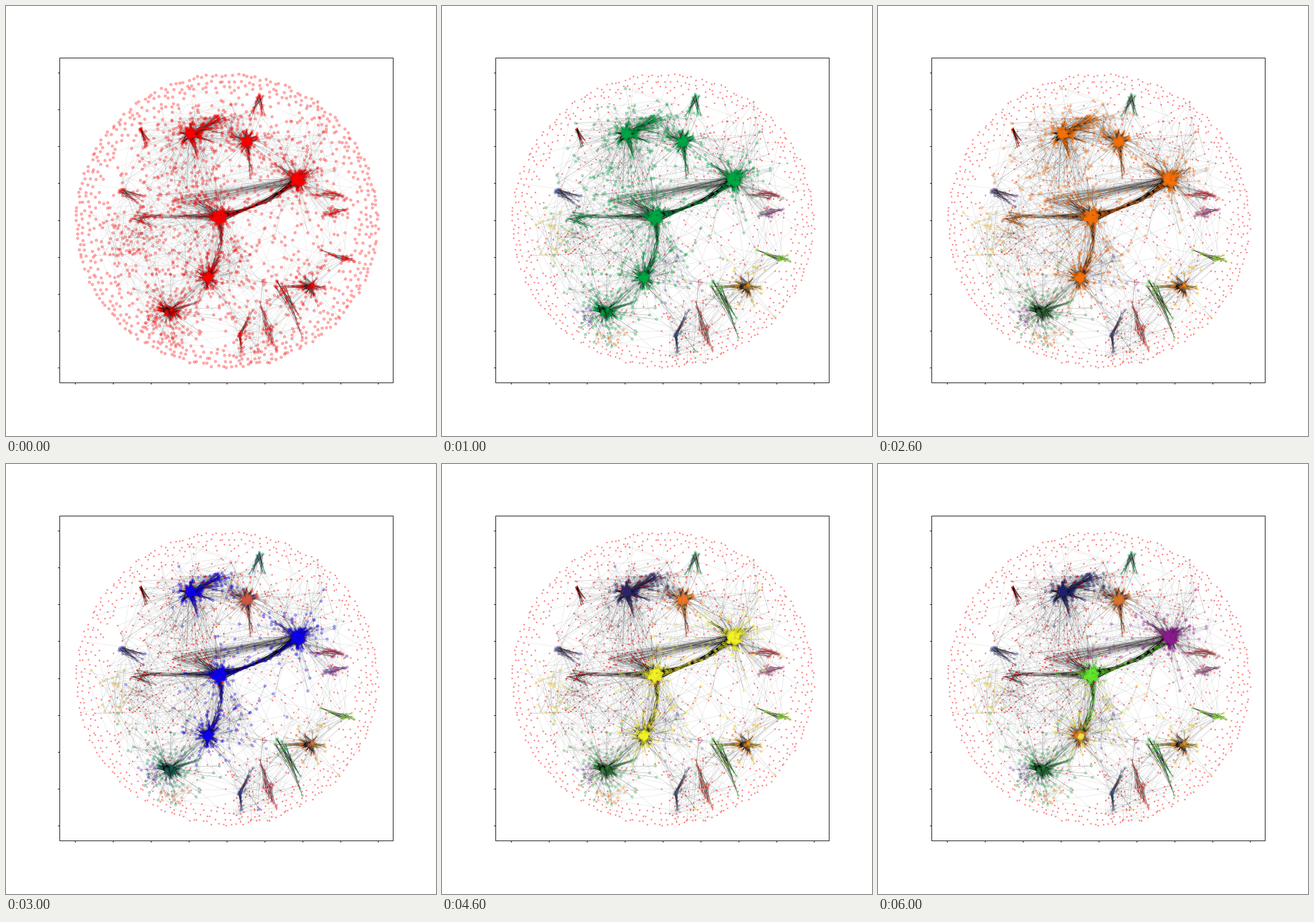
Animation of 748 by 748 pixels, one loop 7000 ms. Source, as a matplotlib script:

```python
import numpy as np
import matplotlib.pyplot as plt
from matplotlib.animation import FuncAnimation
from matplotlib.collections import LineCollection
from matplotlib.colors import to_rgb

STAGE, DPI = 748, 100
CENTRE, RADII = np.array([385, 373.5]), np.array([261, 253])
RED = "#ff0000"

# Colour of the largest community at each split, and how much it tints the rest
MAIN = ["#00aa46", "#fa730a", "#0f00f0", "#f5f528", "#aa00b4", "#64eb32"]
TINT = 0.12

# Step at which a group leaves the largest community, and its own colour;
# None marks loose nodes, which are drawn as small red dots.
SPLIT = {
    "dot": (1, None), "wide": (3, None), "bridge": (7, RED),
    "A": (4, "#140a78"), "B": (3, "#f0692d"), "C": (6, "#9600a0"),
    "D": (7, RED), "E": (5, "#f5e11e"), "E core": (5, "#f07328"),
    "E middle": (5, "#faeb50"), "F": (2, "#1e7846"), "F far": (2, "#1ea04b"),
    "G": (1, "#f5b91e"), "G core": (1, "#eb7828"), "H": (1, "#323c87"),
    "I": (1, "#eb2828"), "J": (1, "#e12846"), "K": (1, "#b4469b"),
    "L": (1, "#82e61e"), "M": (1, "#413ca5"), "Q": (2, "#1e9169"),
    "R": (1, "#f5c31e"), "S": (1, "#32c346"), "T": (1, "#f0821e"),
    "U": (1, "#7832b4"), "V": (1, "#6446c3"),
}

# Small communities: x, y, spread, then angle and length of two arms
MINOR = {
    "H": (407, 569, 6, -64, 45, 88, 32), "I": (455, 562, 6, 254, 49, 73, 37),
    "J": (566, 327, 8, 176, 32, 5, 20), "K": (570, 359, 7, -14, 25, 170, 18),
    "L": (587, 440, 5, 196, 42, 14, 16), "M": (200, 322, 5, 14, 43, 32, 46),
    "Q": (441, 160, 4, 118, 36, 80, 36), "S": (478, 495, 14, 55, 60, 66, 90),
    "wide": (230, 369, 8, -8, 40, 30, 30), "dot": (235, 213, 2, 72, 33, 60, 28),
}

rng = np.random.default_rng(11)
pos, group, links, weight = [], [], [], []


def add(p, name):
    """Place a node, pulling strays back inside the circle."""
    offset = (np.asarray(p) - CENTRE) / RADII
    dist = np.hypot(*offset)
    if dist > 1.02:
        offset *= rng.uniform(0.75, 0.9) / dist
    pos.append(CENTRE + offset * RADII)
    group.append(name)
    return len(pos) - 1


def polar(r, angle):
    return np.array([r * np.cos(angle), r * np.sin(angle)])


def attach(node, targets, k, w):
    for other in rng.choice(targets, k):
        links.append((node, other))
        weight.append(w)


def ring(r, n):
    for i in range(n):
        angle = (i + rng.uniform(-0.4, 0.4)) * 2 * np.pi / n
        add(CENTRE + RADII * polar(r + rng.uniform(-0.012, 0.012), angle), "dot")


def loose(n, gap):
    """Single nodes over the disc that keep a distance from each other."""
    while n:
        r = 0.9 * np.sqrt(rng.random())
        p = CENTRE + RADII * polar(r, rng.uniform(0, 2 * np.pi))
        if np.min(np.hypot(*(np.array(pos) - p).T)) > gap:
            add(p, "dot")
            n -= 1


def cloud(name, n, centre, spread, targets=None, share=0.3):
    nodes = [add(rng.normal(centre, spread), name) for _ in range(n)]
    for node in nodes:
        attach(node, nodes, 1, 0.16)
        if targets and rng.random() < share:
            attach(node, targets, 1, 0.18)
    return nodes


def hub(centre, name, far_name, core, radius, spikes, far, reach):
    phase = rng.uniform(0, 6)
    inner = []
    for angle in rng.uniform(0, 2 * np.pi, core):
        r = radius * np.sqrt(rng.random()) * (1 + 0.2 * np.sin(6 * angle + phase))
        inner.append(add(centre + polar(r, angle), name))
    rays = rng.uniform(0, 2 * np.pi, 18)
    for _ in range(spikes):
        angle = rng.choice(rays) + rng.normal(0, 0.06)
        p = centre + polar(rng.uniform(9, 22), angle)
        attach(add(p, name), inner, 7, 0.38)
    for angle in rng.uniform(0, 2 * np.pi, far):
        p = centre + polar(15 + rng.exponential(reach), angle)
        attach(add(p, far_name), inner, 2, 0.2)
    return inner


def arm(name, root, angle, length, n=8, k=4, w=0.3):
    """Bundle of nodes running away from a root cluster."""
    start = np.mean([pos[i] for i in root], axis=0)
    for t in np.linspace(0.25, 1, n):
        p = start + polar(length * t, np.radians(angle))
        attach(add(p + rng.normal(0, 1.8, 2), name), root, k, w)


def bridge(name, a, b, bulge, n, spread, k, w):
    """Chain of nodes on a bent path between two hubs."""
    p0, p1 = (np.mean([pos[i] for i in hub_], axis=0) for hub_ in (a, b))
    normal = np.array([p0[1] - p1[1], p1[0] - p0[0]])
    chain = []
    for t in np.linspace(0.08, 0.92, n):
        p = p0 + (p1 - p0) * t + normal * bulge * 4 * t * (1 - t)
        chain.append(add(p + rng.normal(0, spread, 2), name))
    for i, node in enumerate(chain):
        attach(node, chain[i:i + n // 3 + 1], k, w)
        if i < n * 0.4:
            attach(node, a, k, w)
        elif i > n * 0.6:
            attach(node, b, k, w)


def web(count, limit, first, w):
    """Faint links between nodes within a given distance."""
    for _ in range(count):
        a = rng.integers(first, len(pos))
        gaps = np.hypot(*(np.array(pos[first:]) - pos[a]).T)
        attach(a, first + np.flatnonzero(gaps < limit), 1, w)


for i, count in enumerate((192, 146, 118, 76)):
    ring(1 - 0.038 * i, count)
ring_count = len(pos)
loose(430, 6.5)
for centre in ((225, 415), (500, 250), (440, 575)):
    cloud("dot", 45, centre, 38)

A = hub((321, 222), "A", "A", 90, 8, 42, 26, 10)
B = hub((419, 236), "B", "B", 90, 9, 26, 36, 20)
C = hub((508, 303), "C", "C", 150, 11, 46, 48, 25)
D = hub((372, 367), "D", "D", 150, 11, 30, 24, 14)
E = hub((352, 472), "E core", "E", 90, 8, 40, 44, 22)
F = hub((284, 530), "F", "F far", 28, 8, 44, 60, 25)
G = hub((530, 487), "G core", "G", 18, 6, 20, 16, 14)
cloud("E middle", 34, (353, 473), 2)

bridge("bridge", D, C, 0.06, 42, 1.8, 7, 0.34)
bridge("bridge", D, E, -0.1, 32, 2.6, 4, 0.3)
bridge("A", A, B, -0.27, 26, 8, 2, 0.22)
bridge("C", B, C, 0.03, 10, 8, 1, 0.2)
arm("A", cloud("A", 34, (366, 202), 9, A, 1), 155, 46, 14)
arm("F far", F, -18, 60, 9, 3)
for name, root, arms in (
        ("A", A, ((75, 45), (23, 40), (-14, 38))), ("B", B, ((83, 62), (200, 30))),
        ("C", C, ((214, 52), (-30, 40))), ("D", D, ((181, 62),)),
        ("wide", D, ((220, 56), (181, 145))), ("G", G, ((178, 58), (10, 26)))):
    for angle, length in arms:
        arm(name, root, angle, length)

# Straight fan of long links into the right-hand hub
for node in cloud("wide", 28, (322, 338), (17, 7)):
    attach(node, C, 2, 0.18)
    attach(node, D, 2, 0.18)
for x in rng.uniform(360, 480, 14):
    node = add((x, 400 - 0.19 * x + rng.normal(0, 5)), "C")
    attach(node, C, 2, 0.2)

for name, (x, y, spread, *arms) in MINOR.items():
    root = cloud(name, 4 + spread, (x, y), spread * 0.7)
    for angle, length in zip(arms[::2], arms[1::2]):
        arm(name, root, angle, length, 7)

for name, n, centre, spread, near in (
        ("wide", 110, (320, 285), (48, 55), A), ("wide", 50, (305, 390), (50, 45), D),
        ("wide", 30, (345, 190), (50, 18), A), ("E", 40, (375, 425), (45, 35), E),
        ("C", 22, (470, 300), (45, 38), C), ("F far", 30, (285, 505), (45, 38), F),
        ("G", 14, (535, 455), (32, 24), G), ("R", 28, (190, 398), 24, None),
        ("T", 15, (300, 576), (18, 9), None), ("U", 15, (256, 538), 9, F),
        ("V", 12, (402, 480), (28, 24), None)):
    cloud(name, n, centre, spread, near)

web(1150, 95, ring_count, 0.15)
web(220, 170, 0, 0.13)

pos, weight = np.array(pos), np.array(weight)
order = {name: i for i, name in enumerate(SPLIT)}
kind = np.array([order[name] for name in group])

fig = plt.figure(figsize=(STAGE / DPI, STAGE / DPI), dpi=DPI, facecolor="white")
left, right, bottom, top = 93.1, 673.2, 655, 89.76
ax = fig.add_axes([left / STAGE, 1 - bottom / STAGE,
                   (right - left) / STAGE, (bottom - top) / STAGE])
ax.set_xlim(left, right)
ax.set_ylim(bottom, top)
ax.set_xticks(120.2 + 65.9 * np.arange(9))
ax.set_yticks(116 + 64.15 * np.arange(9))
ax.tick_params(length=2, width=0.72, labelbottom=False, labelleft=False)
for spine in ax.spines.values():
    spine.set_linewidth(0.72)

edges = LineCollection(pos[np.array(links)], linewidths=0.36, zorder=1)
ax.add_collection(edges)
nodes = ax.scatter(*pos.T, s=11, linewidths=0.6, zorder=2)


def shade(split, own, step):
    """RGBA of a group at one step, and whether its nodes are small."""
    if step == 0:
        return (*to_rgb(RED), 0.3), False
    main = np.array(to_rgb(MAIN[step - 1]))
    if step < split:
        return (*main, 0.3), False
    if own is None:
        return (*to_rgb(RED), 0.36), True
    return (*(np.array(to_rgb(own)) * (1 - TINT) + main * TINT), 0.3), False


def draw(step):
    rgba, small = zip(*(shade(*rule, step) for rule in SPLIT.values()))
    colours = np.array(rgba)[kind]
    nodes.set_facecolor(colours)
    nodes.set_edgecolor(colours)
    nodes.set_sizes(np.where(small, 2.4, 11)[kind])
    ink = np.zeros((len(weight), 4))
    ink[:, 3] = weight * (0.9 if step == 0 else 1.2)
    edges.set_color(ink)
    return edges, nodes


def reset():
    return draw(0)


anim = FuncAnimation(fig, draw, frames=7, interval=1000, init_func=reset,
                     repeat=True, repeat_delay=0, blit=False)
plt.show()
```
